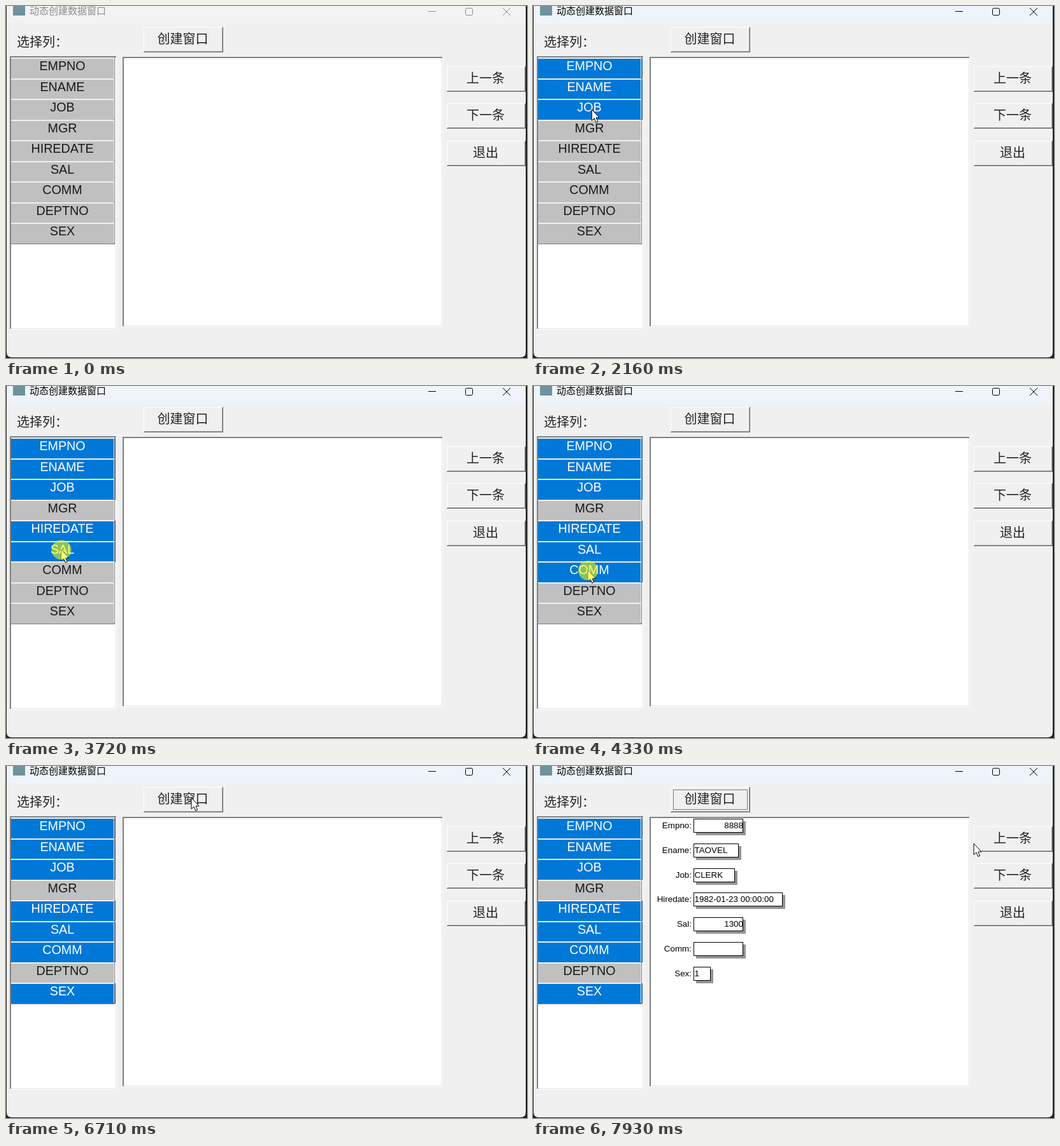
Write an HTML page that moves like this. It is 818 px wide and 554 px high and loops after 8 s.

```html
<!DOCTYPE html>
<html lang="zh-CN">
<head>
<meta charset="utf-8">
<style>
html, body { margin: 0; height: 100%; overflow: hidden; background: #1e1e1e }
svg { display: block }
text { font-family: "Liberation Sans", Arial, sans-serif; white-space: pre }
.cjk { font-family: "Noto Sans CJK SC", "Noto Sans CJK", sans-serif; font-weight: 300; fill: #222 }
</style>
</head>
<body>
<svg id="stage" width="818" height="554" viewBox="0 0 818 554"></svg>
<script>
const stage = document.getElementById('stage');
const LOOP = 8000, PITCH = 32.5;
const ENTER = 330, CREATE = 6850;      // pointer appears, button pressed
const DWELL = 200, GLIDE = 700, RING = 130;

function add(tag, attrs, parent = stage, text = '') {
  const el = document.createElementNS('http://www.w3.org/2000/svg', tag);
  for (const k in attrs) el.setAttribute(k, attrs[k]);
  el.textContent = text;
  parent.append(el);
  return el;
}
const rect = (x, y, width, height, fill, parent) => add('rect', { x, y, width, height, fill }, parent);
const label = (x, y, size, text, anchor = 'start', cls = '', parent) =>
  add('text', { x, y, 'font-size': size, 'text-anchor': anchor, class: cls }, parent, text);
const show = (el, on) => el.setAttribute('visibility', on ? 'visible' : 'hidden');

// Window and title bar
add('path', { d: 'M1 0H816V545Q816 553 808 553H9Q1 553 1 545Z', fill: '#f0f0f0' });
const titleBar = rect(1, 0, 815, 28);
rect(11, 0, 19, 15, '#6f929e');
const title = label(37, 13, 15, '动态创建数据窗口', 'start', 'cjk');
title.style.fontWeight = 400;
const controls = add('g', { fill: 'none' });
add('path', { d: 'M663 8.5H675M780 3L792 15M792 3L780 15' }, controls);
add('rect', { x: 721.5, y: 3.5, width: 11, height: 11, rx: 2 }, controls);

label(17, 64, 20, '选择列：', 'start', 'cjk');

function sunken(x, y, w, h) {
  rect(x, y, w, h, '#fff');
  rect(x, y, w - 1, h - 1, '#808080');
  rect(x + 2, y + 2, w - 3, h - 3, '#e3e3e3');
  rect(x + 2, y + 2, w - 4, h - 4, '#fff');
}
sunken(6, 79, 168, 430);
sunken(183, 80, 503, 425);

function button(x, y, w, text) {
  const h = 40;
  rect(x, y, w, h, '#696969');
  rect(x, y, w - 1, h - 1, '#fff');
  rect(x + 1, y + 1, w - 2, h - 2, '#a0a0a0');
  rect(x + 1, y + 1, w - 3, h - 3, '#f0f0f0');
  label(x + w / 2 - 1, y + 26, 20, text, 'middle', 'cjk');
}
button(216, 33, 125, '创建窗口');
['上一条', '下一条', '退出'].forEach((text, i) => button(692, 95 + 58.5 * i | 0, 124, text));

// Column list with the time each row gets selected
rect(8, 81, 163, 294, '#808080');
const rows = [
  ['EMPNO', 1030], ['ENAME', 1500], ['JOB', 1960], ['MGR'], ['HIREDATE', 3250],
  ['SAL', 3720], ['COMM', 4330], ['DEPTNO'], ['SEX', 5580]
].map(([name, press], i) => {
  const y = Math.round(81 + PITCH * i);
  rect(8, y, 162, 32, '#f0f0f0');
  const face = rect(8, y + 2, 161, 31);
  const edge = rect(170, y + 1, 2, 32, '#3d6d8f');
  const text = label(88.5, 101.4 + PITCH * i, 19.7, name, 'middle');
  // clicks drift towards the left and the row's middle as the list goes on
  return { press, face, edge, text, x: 85 + 20 * .6 ** i, y: 94.5 + PITCH * i + 13 * .5 ** i };
});

// Generated form
const form = add('g', {});
[
  ['Empno:', 78, '8888', true], ['Ename:', 71, 'TAOVEL'], ['Job:', 65, 'CLERK'],
  ['Hiredate:', 140, '1982-01-23 00:00:00'], ['Sal:', 78, '1300', true],
  ['Comm:', 78, ''], ['Sex:', 27, '1']
].forEach(([name, w, value, right], i) => {
  const y = Math.round(83 + 38.8 * i);
  label(249, y + 15, 13.4, name, 'end', '', form);
  rect(256, y + 4, w, 22, '#949494', form);
  add('rect', { x: 252.5, y: y + .5, width: w - 1, height: 21, fill: '#fff', stroke: '#000' }, form);
  label(right ? 252 + w : 253.5, y + 15, 13.4, value, right ? 'end' : 'start', '', form);
});
add('rect', { x: 220.5, y: 37.5, width: 116, height: 31, fill: 'none', stroke: '#000', 'stroke-dasharray': '1 1' }, form);

const cursor = add('path', {
  d: 'M0 0V17.5L4 14L6.8 20.5L9.6 19.2L6.9 13H12Z', fill: '#fff', stroke: '#000', 'stroke-linejoin': 'round'
});
const ring = add('circle', { r: 15.5, fill: '#ff0', 'fill-opacity': .55 });

// Pointer stops: it arrives, presses, dwells, then glides to the next one
const stops = [
  ...rows.filter(r => r.press).map(r => ({ ...r, arrive: r.press - 140 })),
  { x: 291, y: 50, arrive: 6370, press: CREATE },
  { x: 692, y: 122, arrive: 7930, press: LOOP }
];

function pointer(t) {
  let at = { x: 560, y: 556, press: ENTER - DWELL };
  for (const next of stops) {
    const start = Math.max(at.press + DWELL, next.arrive - GLIDE);
    if (t < next.arrive) {
      const u = Math.max(0, (t - start) / (next.arrive - start)), k = u * u * (3 - 2 * u);
      return [at.x + (next.x - at.x) * k, at.y + (next.y - at.y) * k];
    }
    at = next;
  }
  return [at.x, at.y];
}

function draw(t) {
  const active = t >= rows[0].press, ink = active ? '#000' : '#8c8c8c';
  titleBar.setAttribute('fill', active ? '#eef4f9' : '#f3f3f3');
  title.style.fill = ink;
  controls.setAttribute('stroke', ink);
  for (const r of rows) {
    const on = t >= r.press;
    r.face.setAttribute('fill', on ? '#0078d7' : '#c0c0c0');
    r.text.setAttribute('fill', on ? '#fff' : '#1a1a1a');
    show(r.edge, on);
  }
  show(form, t >= CREATE + 60);
  const [x, y] = pointer(t);
  cursor.setAttribute('transform', `translate(${x} ${y})`);
  ring.setAttribute('transform', `translate(${x + .5} ${y + .5})`);
  show(cursor, t >= ENTER);
  show(ring, stops.some(s => t >= s.press && t < s.press + RING));
}

function frame() {
  draw(performance.now() % LOOP);
  requestAnimationFrame(frame);
}
frame();
</script>
</body>
</html>
```
